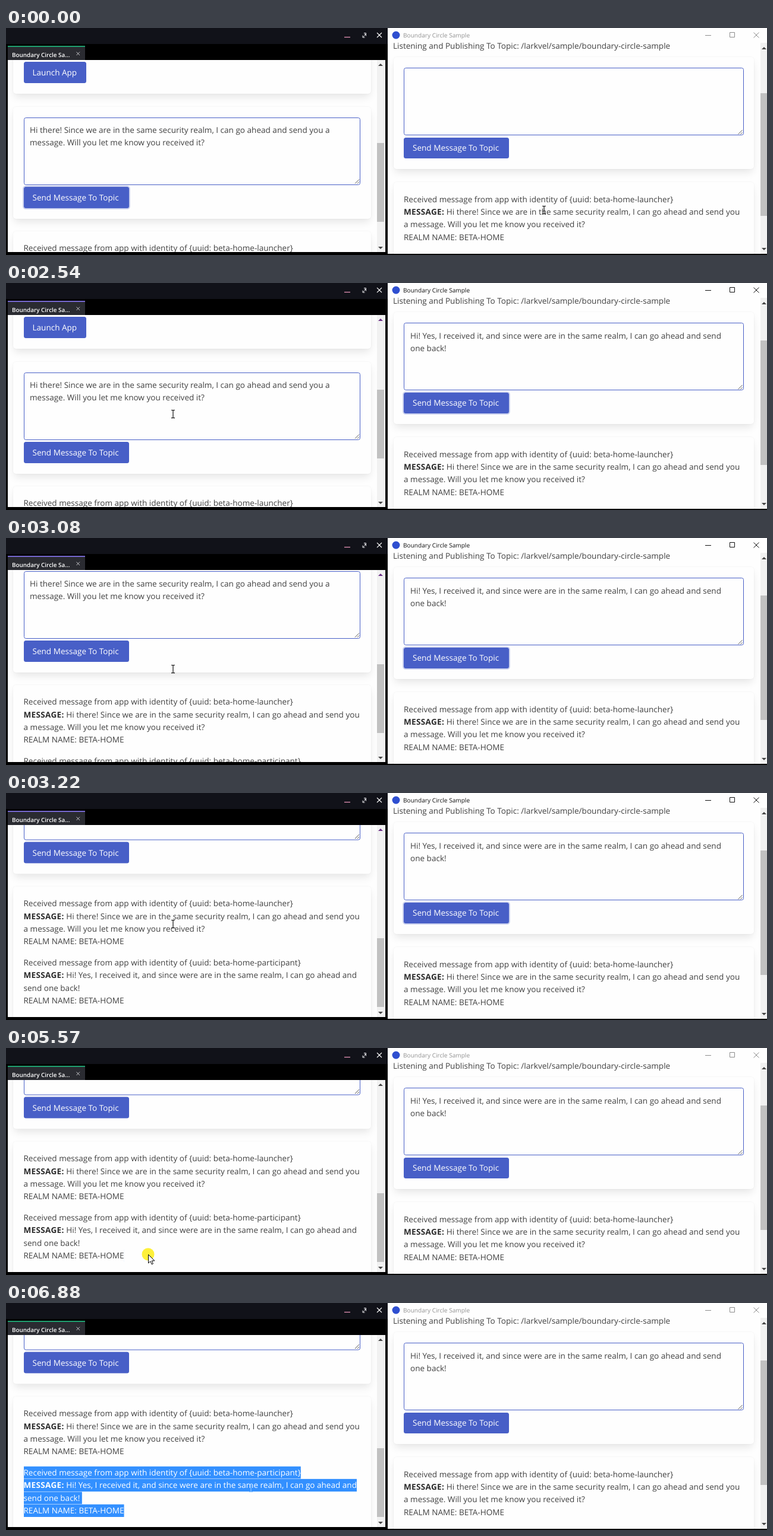
Recreate the animation shown at these times as an HTML page. Size 1280 by 383 pixels, loop 7750 ms.

```html
<!DOCTYPE html>
<html lang="en">
<head>
<meta charset="utf-8">
<title>Two windows exchanging messages</title>
<style>
html, body { margin: 0; width: 100%; height: 100%; overflow: hidden; background: #000; }
body { position: relative; font-family: "Open Sans", "Noto Sans", sans-serif; text-rendering: geometricPrecision; }
div, svg { position: absolute; box-sizing: border-box; }
svg { left: 0; top: 0; }
.page, .scroll { left: 0; top: 0; width: 1280px; height: 383px; }
.page { background: #fefefe; }
#left { clip-path: inset(54px 642px 5px 3px); }
#right { clip-path: inset(25px 0 2px 642px); }
.text { white-space: pre; line-height: 20px; color: #414141; }
.text b { color: #2b2b2b; letter-spacing: .32px; }
.card { background: #fefefe; border-radius: 5px; box-shadow: 0 7px 14px -2px rgba(10,10,10,.1), 0 0 0 1px rgba(10,10,10,.02); }
.field { background: #fefefe; border: 1px solid #485fc7; border-radius: 3.5px; }
.btn { background: #485fc7; border-radius: 3.5px; }
.btn.hover { background: #3e54c2; }
.focus { box-shadow: 0 0 0 2px rgba(72,95,199,.28); }
.btn .text, .sel { color: #fff; }
.sel { background: #3390ff; line-height: 21.4px; }
.sel b { color: #fff; }
.track { background: #f1f1f1; }
.thumb { background: #c1c1c1; }
</style>
</head>
<body>
<script>
const LOOP = 7750, FONT = 13.55, LINE = 21.4;

function add(parent, cls, x, y, w, h) {
  const el = document.createElement('div');
  el.className = cls;
  el.style.cssText = `left:${x}px;top:${y}px` + (w ? `;width:${w}px;height:${h}px` : '');
  parent.append(el);
  return el;
}

function text(parent, x, base, html, size = FONT, css = '') {
  const el = add(parent, 'text', x, base - 10 - .388 * size);
  el.style.cssText += `;font-size:${size}px;${css}`;
  el.innerHTML = html;
  return el;
}

function svg(parent, body) {
  parent.insertAdjacentHTML('beforeend',
    `<svg width="1280" height="383" fill="none">${body}</svg>`);
  return parent.lastElementChild;
}

function lines(parent, x, base, list) {
  list.forEach((s, i) => text(parent, x, base + i * LINE, s));
}

function button(parent, x, y, w, label) {
  const el = add(parent, 'btn', x, y, w, 35.6);
  text(el, 15, 22.8, label);
  return el;
}

// Card with a text area and its send button
function form(parent, x, y, cardW, fieldW) {
  add(parent, 'card', x, y, cardW, 189);
  const field = add(parent, 'field', x + 17.5, y + 18, fieldW, 114);
  const ex = x + 17.5 + fieldW, ey = y + 132;
  svg(parent, `<path d="M${ex - 9} ${ey - 2}l7-7M${ex - 5} ${ey - 2}l3-3" stroke="#555"/>`);
  return { field, send: button(parent, x + 17.5, y + 135.6, 177, 'Send Message To Topic') };
}

const from = id => `Received message from app with identity of {uuid: ${id}}`;
const ask = ['Hi there! Since we are in the same security realm, I can go ahead and send you',
  'a message. Will you let me know you received it?'];
const realm = 'REALM NAME: BETA-HOME';
const first = [from('beta-home-launcher'), '<b>MESSAGE:</b> ' + ask[0], ask[1], realm];
const second = [from('beta-home-participant'),
  '<b>MESSAGE:</b> Hi! Yes, I received it, and since were are in the same realm, I can go ahead and',
  'send one back! ', realm];

function bar(parent, x, w) {
  add(parent, 'track', x, 0, w, 383);
  return add(parent, 'thumb', x, 0, w, 10);
}
const arrows = (x, up, down) =>
  `<path class="up" d="M${x - 4} ${up + 2}h8l-4-4z" fill="#444"/><path d="M${x - 4} ${down - 2}h8l-4 4z" fill="#444"/>`;

// Left window
add(document.body, '', 0, 0, 642, 27).style.background = '#111219';
const tab = add(document.body, '', 3, 30, 130, 24);
tab.style.background = '#2a2b31';
text(tab, 7, 17, 'Boundary Circle Sa...', 9.9, 'color:#fff;font-weight:600');
svg(document.body, `
  <path d="M569 15.5h10" stroke="#e391b4" stroke-width="1.3"/>
  <path d="M602.5 10.5h3v3M605.5 10.5l-3.2 3.2M600 12.5v3.5h3.5M597.5 16M600 16l2.8-2.8M602 8.5h3.5v3.5" stroke="#e4e4e8" stroke-width="1"/>
  <path d="M624 8l8 8m0-8l-8 8" stroke="#fff" stroke-width="1.1"/>
  <path d="M118.5 40.5l5.5 5.5m0-5.5l-5.5 5.5" stroke="#c8c8cc"/>`);

const left = add(document.body, 'page', 0, 0);
left.id = 'left';
const roll = add(left, 'scroll', 0, 0);
add(roll, 'card', 12, 0, 602, 111);
button(roll, 29.5, 57.3, 105, 'Launch App');
const formL = form(roll, 12, 132.5, 602, 566.5);
lines(roll, 40, 177, [ask[0] + ' a', ask[1].slice(2)]);
add(roll, 'card', 12, 343, 602, 240);
lines(roll, 29.5, 376.5, first);
const reply = add(roll, 'scroll', 0, 0);
lines(reply, 29.5, 476.3, second);
const marks = second.map((s, i) => {
  const el = text(reply, 29.5, 476.3 + i * LINE, s);
  el.classList.add('sel');
  el.style.top = 460.9 + i * LINE + 'px';
  return el;
});
const thumbL = bar(left, 624, 12);
const arrowsL = svg(left, arrows(630, 62, 371));

// Right window
const frame = add(document.body, '', 642, 0, 638, 381);
frame.style.background = '#fefefe';
const title = text(frame, 26, 16, 'Boundary Circle Sample', 10.1);
const controls = svg(document.body, `
  <circle cx="656" cy="12" r="6.5" fill="#2f4fd0"/>
  <path d="M1176 12.5h10M1217.5 7.5h8v8h-8zM1257.5 7.5l9 9m0-9l-9 9" stroke="currentColor"/>`);

const right = add(document.body, 'page', 0, 0);
right.id = 'right';
text(right, 651, 35, 'Listening and Publishing To Topic: /larkvel/sample/boundary-circle-sample');
const formR = form(right, 651.5, 49.2, 606.5, 571.5);
const typed = add(right, 'scroll', 0, 0);
lines(typed, 680, 93.8, ['Hi! Yes, I received it, and since were are in the same realm, I can go ahead and send', 'one back!']);
const caret = add(right, '', 740, 101, 1, 18);
caret.style.background = '#222';
add(right, 'card', 651.5, 260, 606.5, 240);
lines(right, 669, 293.8, first);
const thumbR = bar(right, 1269, 11);
svg(right, arrows(1275, 34, 373));

// Pointer
const beam = c => `<path d="M-3 -6.5h2.2l.8.8.8-.8h2.2M0-5.7v11.6M-3 6.7h2.2l.8-.8.8.8h2.2" stroke="${c}" stroke-width="1.2"/>`;
const shapes = {
  beam: beam('#111'),
  light: beam('#8cc4ff'),
  arrow: '<path d="M.5 .5v14.5l3.4-3.2 2.3 5.2 2.2-1-2.2-5h4.7z" fill="#fff" stroke="#000"/>',
  hand: '<path d="M-1.5 1.2a1.5 1.5 0 0 1 3 0v5.6q1.6-1.2 2.6.4 1.6-.9 2.4.5 2.3-.4 2.3 1.6v4.2q0 2-1.6 4v2h-7.8v-1.6l-5-6.6q-.5-2 1.6-1.8l2.5 1.9zM1.6 7v3.2M4.3 7.4v3M6.6 8v2.6" fill="#fff" stroke="#000" stroke-width="1.1" stroke-linejoin="round"/>'
};
const halo = svg(document.body, '<circle r="10.5" fill="#fff13a"/>');
halo.style.mixBlendMode = 'multiply';
const pointer = svg(document.body, Object.entries(shapes)
  .map(([k, body]) => `<g data-kind="${k}">${body}</g>`).join(''));

// Pointer steps: time, shape, x, y
const moves = [
  [0, 'beam', 905, 307], [330, 'hand', 770, 198],
  [2400, 'arrow', 636, 206], [2470, 'beam', 420, 212], [2540, 'beam', 281, 221],
  [4410, 'beam', 281, 225], [4480, 'beam', 279, 252], [4550, 'beam', 275, 290],
  [4620, 'arrow', 266, 321], [4690, 'arrow', 264, 332], [4890, 'arrow', 263, 332],
  [5160, 'arrow', 261, 333], [5230, 'arrow', 256, 337], [5300, 'arrow', 249, 342],
  [5370, 'arrow', 243, 346], [5440, 'arrow', 239, 348], [5660, 'arrow', 236, 346],
  [5730, 'arrow', 230, 339], [5800, 'beam', 222, 327], [5870, 'beam', 208, 315],
  [5950, 'beam', 160, 307], [6020, 'beam', 115, 301], [6090, 'beam', 78, 295],
  [6170, 'beam', 50, 291], [6250, 'beam', 30, 288], [6330, 'arrow', 12, 287],
  [6410, 'arrow', 0, 286], [6610, '', 0, 286], [6810, 'light', 190, 308], [6880, 'light', 412, 312]
];
const scrolls = [[0, 0], [2940, 18], [3010, 52], [3080, 95], [3150, 148], [3220, 185.5]];
const at = (steps, t) => steps.findLast(s => s[0] <= t);
const PRESS = 5500, RELEASE = 6610;

function select(t, x, y) {
  const row = t < PRESS ? 9 : t >= RELEASE ? 0 : Math.max(0, Math.floor((y - 275.4) / LINE));
  const cut = t >= RELEASE ? 0 : Math.max(0, x - 29.5);
  marks.forEach((el, i) => {
    el.style.visibility = i < row ? 'hidden' : 'visible';
    el.style.clipPath = `inset(0 0 0 ${i === row ? Math.min(cut, el.offsetWidth) : 0}px)`;
  });
}

function place(el, top, height) {
  el.style.top = top + 'px';
  el.style.height = height + 'px';
}

function draw(t) {
  const leftOn = t < 330 || t >= PRESS;
  const sent = t >= 2070;
  const scroll = at(scrolls, t)[1];
  const [, kind, x, y] = at(moves, t);

  tab.style.borderTop = `2px solid ${leftOn ? '#1fa06f' : '#7568cf'}`;
  arrowsL.querySelector('.up').setAttribute('fill', leftOn ? '#444' : '#6a2d86');
  title.style.color = leftOn ? '#929292' : '#111';
  controls.style.color = leftOn ? '#8c8c8c' : '#111';

  roll.style.transform = `translateY(${-scroll}px)`;
  reply.style.visibility = sent ? 'visible' : 'hidden';
  if (sent) place(thumbL, 180 + .352 * scroll, 116);
  else place(thumbL, 194, 133);
  place(thumbR, sent ? 97 : 110, sent ? 210 : 207);

  formL.send.classList.toggle('focus', t < 330);
  formR.field.classList.toggle('focus', t >= 330 && t < 1940);
  formR.send.classList.toggle('focus', t >= 1940 && t < PRESS);
  formR.send.classList.toggle('hover', t >= 330 && t < 2400);
  typed.style.visibility = t >= 330 ? 'visible' : 'hidden';
  caret.style.visibility = (t >= 330 && t < 950) || (t >= 1480 && t < 1940) ? 'visible' : 'hidden';

  select(t, x, y);
  const pressed = (t >= 1940 && t < 2070) || (t >= PRESS && t < RELEASE);
  halo.style.visibility = pressed ? 'visible' : 'hidden';
  halo.firstElementChild.setAttribute('transform', `translate(${x} ${y})`);
  for (const g of pointer.children) {
    g.setAttribute('visibility', g.dataset.kind === kind ? 'visible' : 'hidden');
    g.setAttribute('transform', `translate(${x} ${y})`);
  }
}

const start = performance.now();
function tick() {
  draw((performance.now() - start) % LOOP);
  requestAnimationFrame(tick);
}
tick();
</script>
</body>
</html>
```
